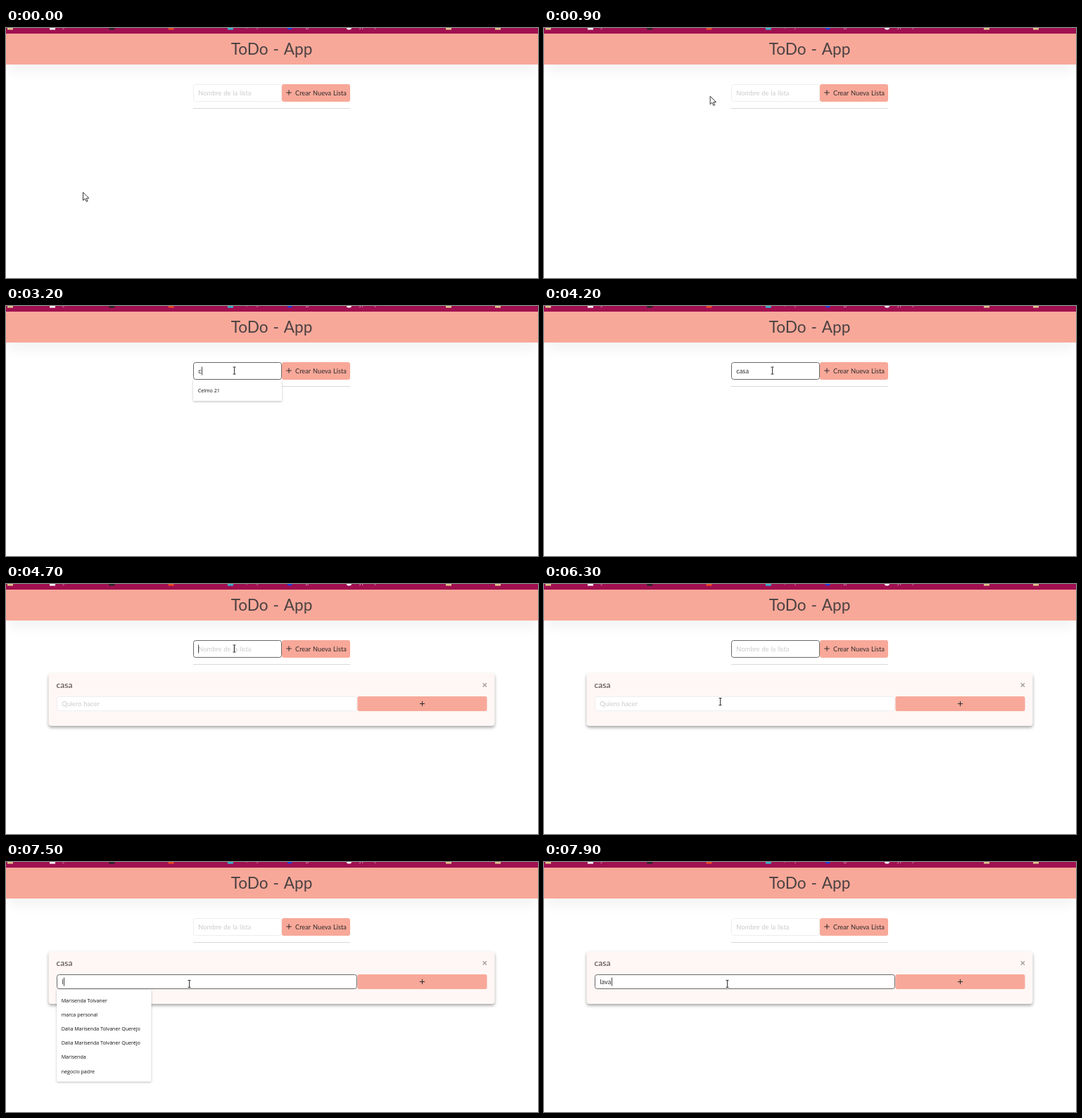
Animation of 756x356 px, one loop 8000 ms. Source, as an HTML page with a canvas:

```html
<!DOCTYPE html>
<html lang="es">
<head>
<meta charset="utf-8">
<title>ToDo - App</title>
<style>
  html, body { margin: 0; width: 100%; height: 100%; overflow: hidden; background: #fff; }
  canvas { display: block; }
</style>
</head>
<body>
<canvas id="stage" width="756" height="356"></canvas>
<script>
const ctx = document.getElementById('stage').getContext('2d');
const LOOP = 8000, STEP = 100, BLINK = 500;
const UI = 'Lato, sans-serif', MENU = '"Open Sans", sans-serif';
const SALMON = '#f8a899', INK = '#2f2b2b', PALE = '#cbcbcb';

// Moments of the story, in ms.
const LIST_CLICK = 1600, LIST_TYPE = 3200, LIST_TYPED = 3700, LIST_ADD = 4700;
const TASK_CLICK = 6500, TASK_TYPE = 7500;

const suggestions = [
  'Marisenda Tolvaner', 'marca personal', 'Dalia Marisenda Tolvaner Querejo',
  'Dalia Marisenda Tolváner Queréjo', 'Marisenda', 'negocio padre'
];

const rest = { x: 109.5, y: 239 }, listField = { x: 324.5, y: 92 }, taskEdge = { x: 250, y: 167.5 };
const moves = [
  { start: 0, end: 200, from: { x: 109.5, y: 234 }, to: rest },
  { start: 400, end: 1200, from: rest, to: listField, bend: { x: 170, y: 70 } },
  { start: 5800, end: 6300, from: listField, to: taskEdge },
  { start: 6700, end: 7000, from: taskEdge, to: { x: 260.5, y: 173.5 } }
];

function pointerAt(t) {
  const { start, end, from, to, bend } = moves.filter(move => move.start <= t).pop();
  const k = Math.min(1, (t - start) / (end - start));
  const u = k * k * (3 - 2 * k);
  const along = axis => {
    const middle = bend ? bend[axis] : (from[axis] + to[axis]) / 2;
    return (1 - u) ** 2 * from[axis] + 2 * u * (1 - u) * middle + u * u * to[axis];
  };
  return [along('x'), along('y')];
}

const typed = (word, start, pace, t) => word.slice(0, Math.max(0, Math.floor((t - start) / pace) + 1));

function caretOn(t) {
  if (t >= LIST_TYPE && t < LIST_TYPED || t >= TASK_TYPE) return true;
  const restarts = [0, LIST_CLICK, LIST_TYPED, LIST_ADD + STEP, TASK_CLICK];
  const last = restarts.filter(moment => moment <= t).pop();
  return Math.floor((t - last) / BLINK) % 2 === 0;
}

function box(x, y, w, h, radius, fill, border) {
  ctx.beginPath();
  ctx.roundRect(x, y, w, h, radius);
  ctx.fillStyle = fill;
  ctx.fill();
  if (border) {
    ctx.strokeStyle = border;
    ctx.lineWidth = 1;
    ctx.stroke();
  }
}

function shadowBox(x, y, w, h, radius, fill, dy, blur, alpha) {
  ctx.save();
  ctx.shadowColor = `rgba(0,0,0,${alpha})`;
  ctx.shadowOffsetY = dy;
  ctx.shadowBlur = blur;
  box(x, y, w, h, radius, fill);
  ctx.restore();
}

function text(string, x, y, size, color, family = UI, align = 'left') {
  ctx.font = `${family === MENU ? 500 : 400} ${size}px ${family}`;
  ctx.wordSpacing = family === UI ? `${size * 0.05}px` : '0px';
  ctx.textAlign = align;
  ctx.fillStyle = color;
  ctx.fillText(string, x, y);
}

function lines(color, width, ...segments) {
  ctx.beginPath();
  for (const [x0, y0, x1, y1] of segments) {
    ctx.moveTo(x0, y0);
    ctx.lineTo(x1, y1);
  }
  ctx.strokeStyle = color;
  ctx.lineWidth = width;
  ctx.stroke();
}

const plus = (x, y, r) => lines(INK, 1, [x - r, y, x + r, y], [x, y - r, x, y + r]);

const cross = (x, y, r) => lines('#a3a0a0', 1.4, [x - r, y - r, x + r, y + r], [x - r, y + r, x + r, y - r]);

// Only the lower edge of the bookmarks shows.
function drawBookmarks() {
  box(0, 0, 756, 8, 0, '#a01050');
  const colors = ['#fff', '#2b2426', '#ee4b22', '#35b6cf', '#1740e0', '#fff'];
  const labels = ['    y', '', '', '        ,      p', '        g', '    yp      p'];
  colors.forEach((color, i) => {
    const x = 62 + 84.3 * i;
    box(x, -6, 8, 8.5, i > 3 ? 4 : 0, color);
    text(labels[i], x + 10, 0, 8, '#e6b8cc', MENU);
  });
  for (const x of [2, 625, 695]) box(x, -6, 8, 8.5, 0, '#e2c48a');
}

function drawHeader() {
  shadowBox(3, 11, 750, 38, 0, SALMON, 13, 17, 0.05);
  box(0, 8, 756, 44, 0, SALMON);
  drawBookmarks();
  text('ToDo - App', 377.5, 38, 22.6, '#4b4242', UI, 'center');
}

function drawInput(x, y, w, h, value, hint, focused, showCaret) {
  box(x + 0.5, y + 0.5, w - 1, h - 1, 3, '#fff', focused ? '#686868' : '#eee');
  const left = x + 7.3, middle = y + h / 2;
  text(value || hint, left, middle + 3.2, 9.3, value ? INK : PALE);
  if (focused && showCaret) {
    const end = Math.round(left + (value ? ctx.measureText(value).width + 0.5 : 0)) + 0.5;
    lines('#444', 1, [end, middle - 6, end, middle + 6]);
  }
}

function drawMenu(x, y, w, items) {
  const row = 20.2;
  shadowBox(x, y, w, items.length * row + 10, 1, '#fff', 1, 3, 0.28);
  items.forEach((item, i) => text(item, x + 6.7, y + 18 + i * row, 7.1, '#111', MENU));
}

function drawCard(value, focused, showCaret) {
  shadowBox(60.5, 127, 634, 75, 4, '#fef7f6', 2.5, 4, 0.34);
  text('casa', 71.5, 148, 12, '#443d3d');
  cross(680.3, 143.8, 2.6);
  drawInput(72, 160, 427, 21, value, 'Quiero hacer', focused, showCaret);
  box(499.5, 160, 184, 21, 2.5, SALMON);
  plus(591.5, 170.5, 3.6);
}

function drawIBeam(x, y) {
  x = Math.floor(x) + 0.5;
  lines('#333', 1, [x, y - 5, x, y + 5], [x - 2, y - 5, x + 2, y - 5], [x - 2, y + 5, x + 2, y + 5]);
}

function drawArrow(x, y) {
  const arrow = new Path2D('M0 0V11.5L2.7 9 4.8 13.2 6.6 12.4 4.7 8.4 8.3 8.2Z');
  ctx.save();
  ctx.translate(x, y);
  ctx.fillStyle = '#fff';
  ctx.fill(arrow);
  ctx.strokeStyle = '#222';
  ctx.lineWidth = 0.9;
  ctx.stroke(arrow);
  ctx.restore();
}

function drawPointer(x, y) {
  const overList = x > 266 && x < 392 && y > 80 && y < 105;
  const overTask = x > 72 && x < 499 && y > 160 && y < 181;
  (overList || overTask ? drawIBeam : drawArrow)(x, y);
}

function draw(t) {
  const added = t >= LIST_ADD, showCaret = caretOn(t);
  const listFocused = t > LIST_CLICK && t < TASK_CLICK;
  const listName = added ? '' : typed('casa', LIST_TYPE, 150, t);

  box(0, 0, 756, 356, 0, '#fff');
  drawHeader();
  drawInput(266, 80, 126, 25, listName, 'Nombre de la lista', listFocused, showCaret);
  box(392, 80, 97, 25, 3, SALMON);
  plus(402, 92, 3.7);
  text('Crear Nueva Lista', 411, 95.7, 9.25, INK);
  lines('#d8d8d8', 1, [266, 114.5, 489, 114.5]);

  if (added) drawCard(typed('lava', TASK_TYPE, 130, t), t > TASK_CLICK, showCaret);
  if (t >= LIST_CLICK && t < LIST_TYPE) drawMenu(266, 105, 134, suggestions);
  if (t === LIST_TYPE) drawMenu(266, 105, 126, ['Celmo 21']);
  if (t >= TASK_CLICK && t <= TASK_TYPE) drawMenu(72, 181.5, 134.5, suggestions);
  drawPointer(...pointerAt(t));
}

function tick() {
  const t = performance.now() % LOOP;
  draw(Math.floor(t / STEP) * STEP);
  requestAnimationFrame(tick);
}
tick();
</script>
</body>
</html>
```
